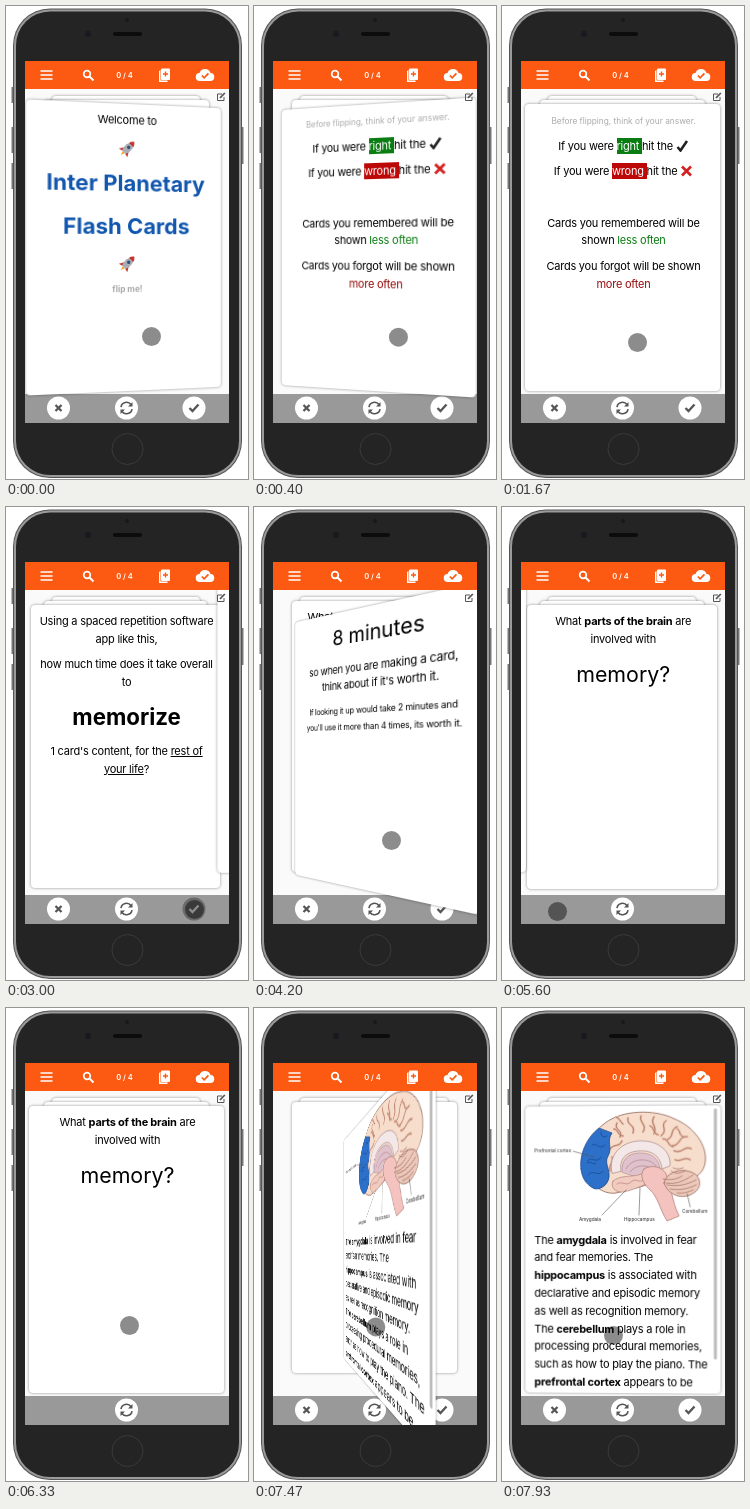
Write an HTML page that moves like this. It is 242 by 473 pixels and loops after 8 s.

```html
<!DOCTYPE html>
<html lang="en">
<head>
<meta charset="utf-8">
<title>Flash cards</title>
<style>
html, body { margin: 0; width: 100%; height: 100%; overflow: hidden; background: #fff; }
#stage { position: relative; width: 242px; height: 473px; overflow: hidden; font-family: Inter, "Open Sans", sans-serif; }
.full { position: absolute; left: 0; top: 0; }
#screen { position: absolute; left: 19px; top: 55px; width: 204px; height: 362px; overflow: hidden; background: #fafafa; }
#world { position: absolute; left: -19px; top: -55px; width: 242px; height: 473px; }
.card { position: absolute; background: #fff; border-radius: 4px; box-shadow: 0 0 3px rgba(0,0,0,.45); }
.face { position: absolute; inset: 0; overflow: hidden; border-radius: 4px; }
.page { position: absolute; top: .5px; left: 50%; width: 195px; height: 287px; margin-left: -96.5px; }
.page p { position: absolute; left: -10px; right: -10px; margin: 0; text-align: center; white-space: pre;
  font-size: 11px; letter-spacing: -.02em; line-height: 16px; color: #000; }
.page p.head { font-size: 21.4px; letter-spacing: 0; }
.page p.head b { font-size: 22.3px; }
.page p.small { font-size: 8.7px; }
.page p.note { font-size: 8.3px; letter-spacing: 0; color: #aaa; }
.page p.blue { font-size: 22.1px; letter-spacing: 0; font-weight: 700; color: #1257ae; }
.page p.left { text-align: left; left: 8px; }
.tag { color: #fff; padding: 1px 0; }
.page p svg { vertical-align: -2px; }
.art { position: absolute; left: 0; top: 0; }
.button circle { fill: #fff; }
.button path { fill: none; stroke: #555; stroke-width: 2.3; }
.pressed circle { fill: #6a6a6a; }
.pressed path { stroke: #fff; }
#header, #edit { z-index: 20; }
#cursor { position: absolute; left: -9.5px; top: -9.5px; width: 19px; height: 19px; border-radius: 50%;
  background: rgba(0,0,0,.45); z-index: 30; }
</style>
</head>
<body>
<div id="stage">
  <svg class="full" width="242" height="473">
    <path d="M6.500 81v16M6.500 121v26M6.500 157v26M236.500 121v37" stroke="#777" stroke-width="2"/>
    <rect x="7" y="2.500" width="229" height="469.500" rx="37" fill="#555"/>
    <rect x="8" y="3.500" width="227" height="467.500" rx="36" fill="#9a9a9a"/>
    <rect x="10" y="5.500" width="223" height="463.500" rx="34" fill="#242424"/>
    <circle cx="121" cy="14" r="2" fill="#181818"/>
    <circle cx="82" cy="28" r="3" fill="#181a20"/>
    <rect x="107" y="26" width="29" height="4" rx="2" fill="#0c0c0c"/>
    <circle cx="121.500" cy="443" r="15.500" fill="none" stroke="#3a3a3a"/>
  </svg>
  <div id="screen"><div id="world">
    <svg class="full" width="242" height="473" fill="none">
      <rect x="19" y="388" width="204" height="30" fill="#999"/>
      <g id="no" class="button"><circle cx="52.500" cy="402" r="11.500"/><path d="M49.500 399l6 6m0-6l-6 6"/></g>
      <g id="yes" class="button"><circle cx="188" cy="402" r="11.500"/><path d="M183.500 402l3 3 6-6.500"/></g>
      <circle cx="120.500" cy="402" r="11.500" fill="#fff"/>
      <path d="M115 401a5.600 5.600 0 0 1 10-2.500M126 403a5.600 5.600 0 0 1-10 2.500" stroke="#555" stroke-width="1.600"/>
      <path d="M126.500 396v4.500h-4.500zM114.500 408v-4.500h4.500z" fill="#555"/>
    </svg>
    <svg id="header" class="full" width="242" height="84" fill="none">
      <rect x="19" y="55" width="204" height="28" fill="#fc5a12"/>
      <path d="M34.500 65h12M34.500 69h12M34.500 73h12" stroke="#fff" stroke-width="1.400"/>
      <circle cx="81" cy="68" r="3.300" stroke="#fff" stroke-width="1.700"/>
      <path d="M83.500 70.500l4 4" stroke="#fff" stroke-width="2"/>
      <text x="118.500" y="71.800" fill="#fff" font-size="7.500" font-weight="600" text-anchor="middle">0 / 4</text>
      <path d="M153 65l1.500-1v10.500h7V76H153z" fill="#fff"/>
      <rect x="155" y="62.500" width="9" height="11.500" rx="1" fill="#fff"/>
      <path d="M159.500 65.500v5M157 68h5" stroke="#fc5a12" stroke-width="1.400"/>
      <path d="M194 75a4 4 0 0 1-.5-8 5.800 5.800 0 0 1 11 0 4 4 0 0 1-.5 8z" fill="#fff"/>
      <path d="M195.800 69.500l2.400 2.400 4.200-4.500" stroke="#fc5a12" stroke-width="1.700"/>
    </svg>
    <svg id="edit" class="full" width="242" height="100" fill="none" stroke="#555">
      <path d="M216 88h-4.500v6.500h6.500v-3.500" stroke-width="1"/><path d="M214 92l4.800-5" stroke-width="1.800"/>
    </svg>
    <div id="cursor"></div>
  </div></div>
</div>
<script>
const LOOP = 8000, TOP = 98;
const $ = id => document.getElementById(id);

// y is the middle of the line on the stage
const line = (y, html, cls = '') => `<p class="${cls}" style="top:${y - TOP - 8}px">${html}</p>`;
const icon = (path, color) => `<svg width="13" height="12" fill="none" stroke="${color}" stroke-width="2.600"><path d="${path}"/></svg>`;
const rocket = y => `<svg class="art" style="top:${y - TOP - 9}px" width="195" height="18">
  <g transform="translate(98 9) rotate(45)">
    <path d="M-3 2l-3 5 4-1zM3 2l3 5-4-1z" fill="#c8322b"/><path d="M-1.500 6h3L0 10z" fill="#f4a024"/>
    <path d="M0-9Q6-2 2.500 6h-5Q-6-2 0-9z" fill="#a9adb5"/><path d="M0-9Q2.500-7 3-4.500h-6Q-2.500-7 0-9z" fill="#c8322b"/>
    <circle cy="-1" r="1.700" fill="#34516f"/>
  </g></svg>`;

const folds = `M113 114c-4 7 7 7 3 14m8-19c-2 8 8 6 5 15m8-17c-3 6 7 9 2 16m11-15c-5 7 4 9 0 17m12-13c-7 5 3 9-5 15m16-9c-8 3-2 10-10 13
  m20-3c-9-1-6 9-15 9m19 3c-7-4-9 6-17 2m16 9c-6-4-9 3-15 0M106 140c4-6 9-1 12-8m-8-12c5 0 3 7 9 7m-13 35c-2-6 4-8 2-14
  m38-31c5 2 2 7 8 9m5 4c6 0 4 7 10 8m4-18c4 2 1 6 6 8m-67-20c4 1 4 5 7 7`;
const brain = `<svg class="art" width="195" height="120" viewBox="22 98 195 120" fill="none" stroke-linecap="round">
  <path d="M80 158C76 144 85 126 101 114 118 101 150 100 170 110 190 118 203 137 201 153 200 163 193 169 184 170L158 171 136 178 112 184C98 186 84 174 80 158z" fill="#f6ddcc" stroke="#8d6357" stroke-width=".8"/>
  <path d="${folds}" stroke="#e8bda9" stroke-width="2.400"/><path d="${folds}" stroke="#a56c5c" stroke-width=".8"/>
  <path d="M77 160C75 145 83 128 95 119L108 124C102 132 109 139 104 147 100 154 106 160 105 168 104 177 94 182 89 179 82 175 78 169 77 160z" fill="#2d70c9" stroke="#194a8e" stroke-width=".8"/>
  <path d="M83 152c6-6 8 4 14-4m-9-12c6-4 5 6 13 0m-4-13c0 5 3 6 6 4m-19 39c5-7 10 3 15-4m-16-8c4-3 6 3 9 0" stroke="#194a8e" stroke-width=".8"/>
  <path d="M108 164C104 146 117 133 135 132 154 131 167 142 166 157L158 160C156 146 147 141 134 142 121 143 115 151 117 162z" fill="#f3e8e7" stroke="#a9898d" stroke-width=".7"/>
  <path d="M118 163C117 151 124 144 136 144 150 144 156 152 156 163L137 169z" fill="#dfc2cb" stroke="#a98798" stroke-width=".6"/>
  <path d="M122 160c4-10 22-13 30-3m-26 6c5-7 16-8 22-3" stroke="#b98c9b" stroke-width=".8"/>
  <path d="M109 172c7-6 18-4 25-6 8-3 13-1 17 3-8 7-20 11-31 14-9 1-14-5-11-11z" fill="#f1cbbf" stroke="#a77770" stroke-width=".6"/>
  <path d="M113 175c5-4 9 3 14-2s8 2 12-2" stroke="#b58074" stroke-width=".7"/>
  <path d="M140 160c8-5 18-2 22 5 6 13 5 26 13 42l-12 5c-8-13-9-24-17-31-7-6-11-15-6-21z" fill="#f4c3c0" stroke="#a77770" stroke-width=".7"/>
  <path d="M160 174c2-10 15-15 26-11 11 3 12 15 5 20-9 8-26 6-31-9z" fill="#ecc9bb" stroke="#905e53" stroke-width=".7"/>
  <path d="M162 174c9 2 19-2 27-8m-26 10c10 2 20 0 29-5m-26 9c9 2 18 0 26-4m-19 8c6 1 12-1 16-3m-22-19c4 4 10 2 14 0m-12-3c4 2 7 1 10 0m-20 11c8 2 15 0 19-3" stroke="#a06a5d" stroke-width=".7"/>
  <path d="M69 142l21 6M98 206l24-25M135 206l1-27M186 198l-3-13" stroke="#555" stroke-width=".6"/>
  <g fill="#222" font-size="4.700"><text x="30" y="143">Prefrontal cortex</text><text x="75" y="212">Amygdala</text>
    <text x="120" y="212">Hippocampus</text><text x="178" y="204">Cerebellum</text></g>
  </svg>`;

const brainText = [
  'The <b>amygdala</b> is involved in fear', 'and fear memories. The', '<b>hippocampus</b> is associated with',
  'declarative and episodic memory', 'as well as recognition memory.', 'The <b>cerebellum</b> plays a role in',
  'processing procedural memories,', 'such as how to play the piano. The', '<b>prefrontal cortex</b> appears to be'];

const decks = [
  [line(113, 'Welcome to') + rocket(141) + line(176, 'Inter Planetary', 'blue') + line(219, 'Flash Cards', 'blue') +
     rocket(256) + line(282, '<b>flip me!</b>', 'note'),
   line(114, 'Before flipping, think of your answer.', 'note') +
     line(139, `If you were <span class="tag" style="background:#0a7d12">right </span>hit the ${icon('M1.500 7l3 3.500L11 1', '#222')}`) +
     line(164, `If you were <span class="tag" style="background:#bd0808">wrong </span>hit the ${icon('M2 1.500l9 9m0-9l-9 9', '#d3201f')}`) +
     line(216, 'Cards you remembered will be') + line(233.5, 'shown <span style="color:#0a7d12">less often</span>') +
     line(259, 'Cards you forgot will be shown') + line(277, '<span style="color:#970b0b">more often</span>')],
  [line(113, 'Using a spaced repetition software') + line(131, 'app like this,') + line(156, 'how much time does it take overall') +
     line(174, 'to') + line(209, '<b>memorize</b>', 'head') + line(243, "1 card's content, for the <u>rest of</u>") + line(261, '<u>your life</u>?'),
   line(123, '8 minutes', 'head') + line(157, 'so when you are making a card,') + line(174.5, "think about if it's worth it.") +
     line(201, 'If looking it up would take 2 minutes and', 'small') + line(218.5, "you'll use it more than 4 times, its worth it.", 'small')],
  [line(113, 'What <b>parts of the brain</b> are') + line(131, 'involved with') + line(166, 'memory?', 'head'),
   brain + brainText.map((s, i) => line(231 + i * 17.8, s, 'left')).join('') +
     '<svg class="art" width="195" height="260"><rect x="187.500" y="2" width="3" height="250" rx="1.500" fill="#bbb"/></svg>'],
  ['', ''], ['', '']];

const cards = decks.map((faces, i) => {
  const el = document.createElement('div');
  el.className = 'card';
  el.style.zIndex = 10 - i;
  el.innerHTML = faces.map(html => `<div class="face"><div class="page">${html}</div></div>`).join('');
  $('world').append(el);
  return el;
});

const flips = [-20, 3900, 7290];
const swipes = [{ at: 2660, dir: 1 }, { at: 5220, dir: -1 }];
const pressed = { yes: [[2600, 3150]], no: [[5200, 5600]] };
const buttonsShown = [[0, 3150], [3880, 5600], [7320, LOOP]];
const path = [[0, 145, 330], [300, 145, 330], [800, 135, 336], [1670, 135, 336], [2200, 188, 402], [3050, 188, 402],
  [3400, 148, 347], [3530, 137, 333], [4250, 137, 333], [4670, 72, 397], [4800, 55, 404], [5800, 55, 404],
  [6330, 123, 317], [7330, 123, 317], [7930, 111, 327]];

// critically damped spring from 0 to 1
const spring = ms => {
  if (!(ms > 0)) return 0;
  const x = ms * 0.012;
  return 1 - (1 + x) * Math.exp(-x);
};
const within = (t, spans) => spans.some(([a, b]) => t >= a && t < b);

function cursorAt(t) {
  const n = path.findIndex(p => p[0] > t);
  if (n < 0) return path.at(-1).slice(1);
  const [a, b] = [path[n - 1], path[n]];
  const u = (t - a[0]) / (b[0] - a[0]), k = u * u * (3 - 2 * u);
  return [1, 2].map(i => a[i] + (b[i] - a[i]) * k);
}

function draw(t) {
  const gone = swipes.map(s => spring(t - s.at));
  const progress = gone[0] + gone[1];
  cards.forEach((el, i) => {
    const place = i - progress;
    const depth = Math.min(2, Math.max(0, place));
    const shrink = depth ** 0.66;
    const top = TOP - 4 * depth, bottom = 385 - 20 * shrink;
    const out = gone[i] || 0;
    const turn = 180 * spring(t - flips[i]);
    const back = turn > 90;
    Object.assign(el.style, {
      left: 22.5 + 15 * shrink + 'px', width: 195 - 30 * shrink + 'px',
      top: top + 'px', height: bottom - top + 'px',
      visibility: out > 0.997 || place > 2.9 ? 'hidden' : 'visible',
      transform: `translate(${out * 206 * (swipes[i]?.dir || 0)}px, ${-21 * out}px) perspective(270px) rotateY(${back ? turn - 180 : turn}deg)`
    });
    el.children[0].style.display = back ? 'none' : '';
    el.children[1].style.display = back ? '' : 'none';
  });
  for (const id of ['no', 'yes']) {
    $(id).style.display = within(t, buttonsShown) ? '' : 'none';
    $(id).classList.toggle('pressed', within(t, pressed[id]));
  }
  const [x, y] = cursorAt(t);
  $('cursor').style.transform = `translate(${x}px, ${y}px)`;
}

const start = performance.now();
function tick() {
  draw((performance.now() - start) % LOOP);
  requestAnimationFrame(tick);
}
draw(0);
requestAnimationFrame(tick);
</script>
</body>
</html>
```
